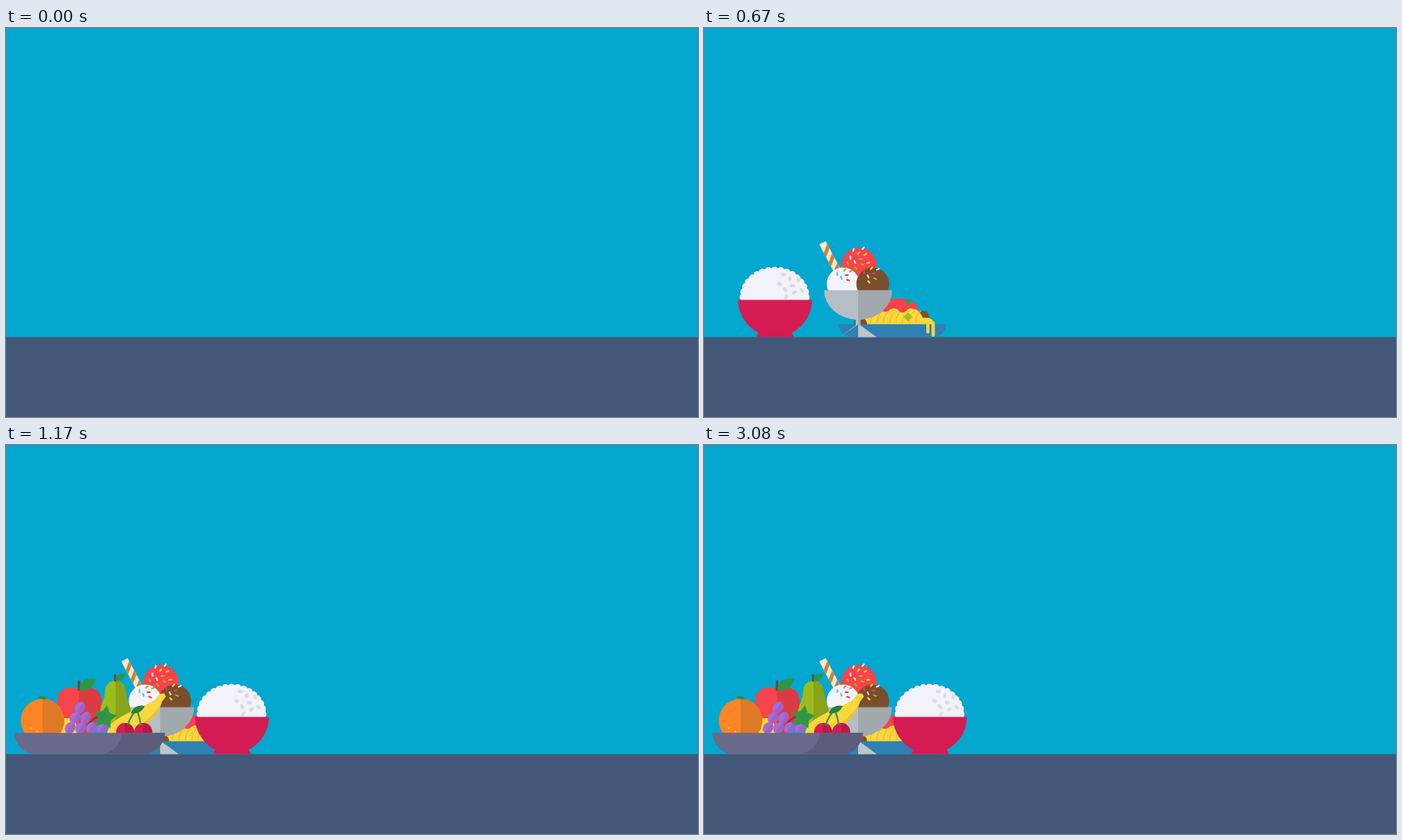
These frames come from a looping animation (853x480 px, 3.16 s). An HTML page:

```html
<!DOCTYPE html>
<html lang="en">
<head>
<meta charset="utf-8">
<title>Food on a table</title>
<style>
html, body { margin: 0; width: 100%; height: 100%; overflow: hidden; background: #03a7cf; }
svg { display: block; width: 853px; height: 480px; }
</style>
</head>
<body>
<svg viewBox="0 0 853 480" xmlns="http://www.w3.org/2000/svg">
  <rect width="853" height="480" fill="#03a7cf"/>
  <rect y="381.4" width="853" height="99" fill="#435778"/>

  <g id="pasta">
    <circle cx="270.5" cy="356" r="7.2" fill="#7b502f"/>
    <path fill="#fdd63c" d="M194 366C197 353 205 345 218 344H250C262 345 267 351 270 358C279 356 284.5 361 284.5 368H194Z"/>
    <g id="strands" fill="none" stroke="#e3b630"></g>
    <path fill="#f6434b" d="M203 351C207 342 214 334 229 334H247C258 336 262 341 265 346C260 348 258 346 255 346C250 346 249 352 244 351C239 350 240 346 234 346C228 346 228 351 222 350C217 349 216 346 211 350Z"/>
    <g fill="#7b502f">
      <circle cx="193" cy="365.5" r="8.2"/>
      <circle cx="218" cy="335.7" r="8.3"/>
    </g>
    <g fill="#369b45">
      <circle cx="200.500" cy="349" r="3.4"/>
      <circle cx="252" cy="338" r="3.4"/>
    </g>
    <path fill="#a0bf1e" d="M251.5 351L257 356.5L251.5 362L246 356.5Z"/>
    <path fill="#2f80b3" d="M166 365.5H298.5C298 375 291 381.5 281 381.5H184C173 381.5 167 375 166 365.5Z"/>
    <path d="M276 364V375M282.5 364V379" stroke="#fdd63c" stroke-width="4" stroke-linecap="round"/>
  </g>

  <g id="sundae">
    <g id="straw" transform="translate(146 265) rotate(-28)">
      <path fill="#fbe7c6" d="M-4.5 0H4.5V41H-4.5Z"/>
    </g>
    <circle cx="191" cy="293" r="21.8" fill="#f9434b"/>
    <circle cx="171.5" cy="315.7" r="20.2" fill="#f3f4fc"/>
    <circle cx="208" cy="315.7" r="20.2" fill="#7a4e2c"/>
    <g id="sprinkles" stroke-width="2" stroke-linecap="round"></g>
    <path fill="#b5bec4" d="M148 323.5H190V366L167 381.5H190V360A42 36.5 0 0 1 148 323.5ZM187 358H190V381.5H167L187 367Z"/>
    <path fill="#a1a9ad" d="M190 323.5H232A42 36.5 0 0 1 193 360V368H190Z"/>
    <path fill="#bfc5c9" d="M190 367H193L213 381.5H190Z"/>
  </g>

  <g id="rice">
    <g id="mound" fill="#f3f2fb">
      <path d="M236 336A42 39.500 0 0 1 320.500 336Z"/>
    </g>
    <g id="grains" fill="#dcdbe0"></g>
    <path fill="#d41b52" d="M233 335.5H324A45.5 45.5 0 0 1 299 376L302 381.5H255.5L258 376A45.5 45.5 0 0 1 233 335.5Z"/>
  </g>

  <g id="fruit">
    <path fill="#f5444a" d="M90 302C80 295 63 300 63 316C63 333 71 348 80 356H90Z"/>
    <path fill="#dd3b42" d="M90 302C101 295 118 300 118 316C118 333 110 348 100 356H90Z"/>
    <path d="M90 290.5V303" stroke="#6f4527" stroke-width="3"/>
    <path fill="#2f9645" d="M90.5 303C90 291 100 286 111 289C108 299 101 304 90.5 303Z"/>

    <path fill="#9cbc1c" d="M135 291C126 291 122 297 122 306C121 316 116 321 116 331C116 343 124 350 135 350Z"/>
    <path fill="#87a41a" d="M135 291C144 291 148 297 148 306C149 316 154 321 154 331C154 343 146 350 135 350Z"/>
    <path d="M134.5 283V292" stroke="#6f4527" stroke-width="2.6"/>
    <path fill="#2f9645" d="M135 291C135 284 140 281.5 147 282.5C146 289 141 292 135 291Z"/>

    <path fill="#fbd63d" d="M68 337H84L90 356H66Z"/>
    <path fill="#fbd63d" d="M124 356L128 346C142 331 168 325 184 314L189.5 307L195 306.5L197 310.5L192 317C188 335 171 350 148 356Z"/>
    <path fill="#eac336" d="M146 356C166 347 184 333 192 317C188 335 171 350 150 356Z"/>

    <circle cx="45" cy="340" r="26.8" fill="#fc8526"/>
    <path fill="#e07927" d="M45 313.2A26.8 26.8 0 0 1 45 366.8Z"/>
    <path fill="#2f8a3f" d="M39 312Q45 307 51 313Q45 315 39 312Z"/>
    <path d="M30.5 349.5h0M38.5 353.5h0" stroke="#fdc083" stroke-width="2" stroke-linecap="round"/>

    <path d="M99 349Q105 338 114 335" fill="none" stroke="#6f4527" stroke-width="2"/>
    <g id="grapes"></g>
    <g id="leaf" fill="#2f9645"></g>

    <g id="cherries"></g>
    <path d="M150 346Q153 335 161 327Q165 335 166 346" fill="none" stroke="#2f9645" stroke-width="2"/>
    <path fill="#25813a" d="M154 331C156 324 163 320 171 322C168 329 162 332 154 331Z"/>

    <path fill="#696a89" d="M10 355.3H196C194 371 184 381.5 169 381.5H37C22 381.5 12 371 10 355.3Z"/>
    <path fill="#5c5d7b" d="M143 355.3H196C194 371 184 381.5 169 381.5H118C134 378 142 368 143 355.3Z"/>
  </g>
</svg>
<script>
const NS = "http://www.w3.org/2000/svg";
const $ = id => document.getElementById(id);

function add(parent, tag, attrs) {
  const el = document.createElementNS(NS, tag);
  for (const k in attrs) el.setAttribute(k, attrs[k]);
  $(parent).appendChild(el);
}

const place = (x, y, turn) => `translate(${x} ${y}) rotate(${turn})`;

// even scatter of n parts inside a circle
function scatter(cx, cy, r, n, put) {
  for (let i = 0; i < n; i++) {
    const a = 2.4 * i, d = r * Math.sqrt((i + 0.5) / n);
    put(cx + d * Math.cos(a), cy + d * Math.sin(a), i);
  }
}

function sprinkle(cx, cy, r, n, colors) {
  scatter(cx, cy, r, n, (x, y, i) => add("sprinkles", "path", {
    d: "M-1.500 0H1.500",
    stroke: colors[i % colors.length],
    transform: place(x, y, 67 * i)
  }));
}

const GREEN = "#97ba25", YELLOW = "#fbd63d", WHITE = "#f6e9ec", BLUE = "#5cc5e8", RED = "#ef3f48";
sprinkle(190, 285, 15, 11, [GREEN, WHITE, YELLOW]);
sprinkle(173, 305, 10, 6, [RED, BLUE, GREEN]);
sprinkle(206, 303, 11, 7, [RED, WHITE, YELLOW, GREEN]);

for (let y = 4; y < 34; y += 13)
  add("straw", "path", { d: `M-4.500 ${y + 8}L4.500 ${y}v6L-4.500 ${y + 14}Z`, fill: "#c8813f" });

for (let i = 0; i < 8; i++)
  add("strands", "path", { d: `M${205 + 8 * i} 364q${i < 4 ? 1 : -1} -10 7 -15` });

// bumpy outline of the rice
for (let i = 0; i <= 16; i++) {
  const a = Math.PI * i / 16;
  add("mound", "circle", { cx: 278 - 38.5 * Math.cos(a), cy: 332 - 33 * Math.sin(a), r: 4.6 });
}
scatter(296, 318, 17, 9, (x, y, i) => add("grains", "ellipse", {
  rx: 3.2, ry: 2.2, transform: place(x, y, 50 * i)
}));

for (let row = 0; row < 3; row++)
  for (let i = 0; i <= row + (row > 1); i++) {
    const at = place(91 - 6 * row + 13 * i, 324 + 12.5 * row, -55);
    add("grapes", "ellipse", { rx: 7.6, ry: 6, transform: at, fill: "#a66dd3" });
    add("grapes", "path", { d: "M-7.600 0A7.600 6 0 0 0 7.600 0Z", transform: at, fill: "#9b62c8" });
  }

const star = Array.from({ length: 10 }, (_, i) => {
  const a = Math.PI * i / 5 - 1.4, r = i % 2 ? 8 : 15;
  return [122 + r * Math.cos(a), 336 + r * Math.sin(a)];
});
add("leaf", "polygon", { points: star.join(" ") });

for (const x of [146.8, 169.2]) {
  add("cherries", "circle", { cx: x, cy: 354, r: 11, fill: "#d41b52" });
  add("cherries", "path", { d: `M${x} 343a11 11 0 0 1 0 22Z`, fill: "#b91848" });
}

// each dish slides in from beyond the left edge
const starts = { pasta: 85, sundae: 303, rice: 564, fruit: 813 };
const SLIDE = 250, LOOP = 3160, FPS = 12;
const reach = {};
for (const id in starts) {
  const box = $(id).getBBox();
  reach[id] = box.x + box.width;
}

function draw(ms) {
  const t = Math.floor((ms + 5) * FPS / 1000) * 1000 / FPS;
  for (const id in starts) {
    const done = Math.min(1, Math.max(0, (t - starts[id]) / SLIDE));
    $(id).setAttribute("transform", `translate(${(done - 1) * reach[id]} 0)`);
    $(id).setAttribute("visibility", done ? "visible" : "hidden");
  }
}

const t0 = performance.now();
function tick() {
  draw((performance.now() - t0) % LOOP);
  requestAnimationFrame(tick);
}
tick();
</script>
</body>
</html>
```
